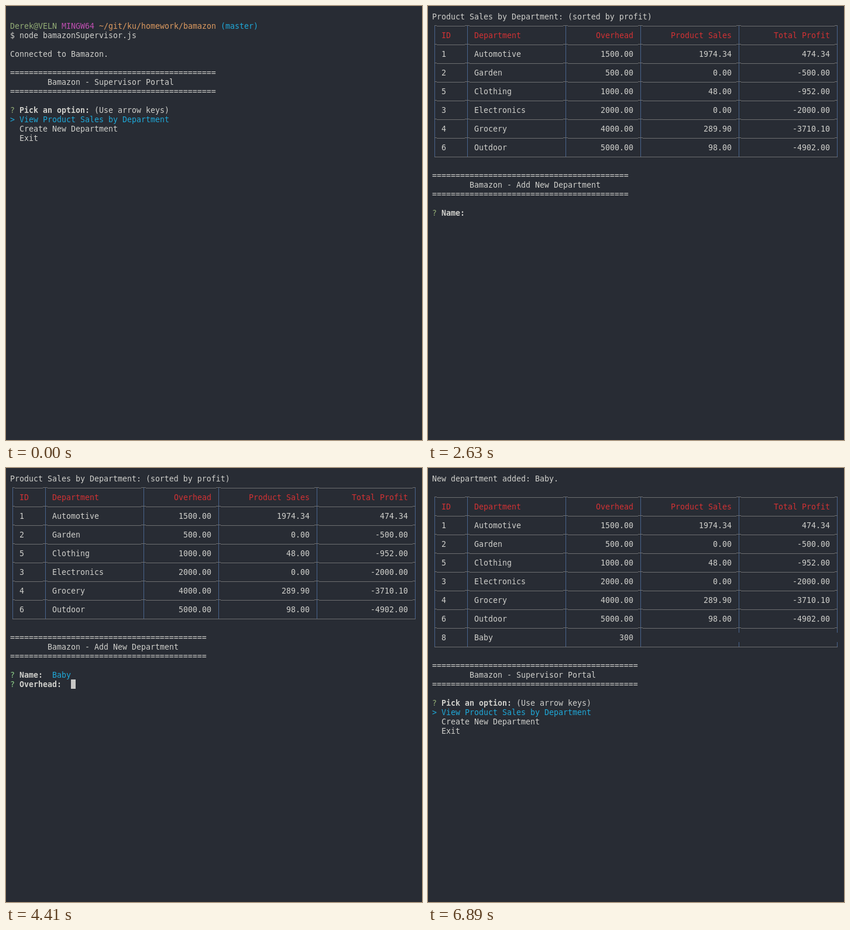
Animation of 711 by 743 pixels, one loop 9830 ms. Source, as an HTML page:

```html
<!DOCTYPE html>
<html lang="en">
<head>
<meta charset="utf-8">
<title>Supervisor portal</title>
<style>
  html, body { margin: 0; width: 100%; height: 100%; overflow: hidden; background: #282c34; }
  svg { display: block; width: 711px; height: 743px; }
  text { font: 13.29px "DejaVu Sans Mono", "Liberation Mono", monospace; white-space: pre; }
  .bold { font-weight: bold; }
</style>
</head>
<body>
<svg id="screen" viewBox="0 0 711 743"></svg>
<script>
const LOOP = 9830, CELL_W = 8, CELL_H = 16, LEFT = 7, TOP = 10;
const C = {
  fg: '#cfcfcb', green: '#93ad76', bright: '#8fd08a', magenta: '#c04fb2',
  orange: '#dc9a60', cyan: '#1fa8d8', red: '#d23234',
  rule: '#6d6e70', wall: '#49648c', cursor: '#c8c8c6'
};
const screen = document.getElementById('screen');
let layer;

const px = col => LEFT + col * CELL_W;
const py = row => TOP + row * CELL_H;

function add(tag, attrs) {
  const el = document.createElementNS('http://www.w3.org/2000/svg', tag);
  for (const key in attrs) el.setAttribute(key, attrs[key]);
  return layer.appendChild(el);
}

const rect = (x, y, width, height, fill) => add('rect', { x, y, width, height, fill });

function text(col, row, str, fill = C.fg, cls = '') {
  add('text', { x: px(col), y: py(row) + 13, fill, class: cls }).textContent = str;
}

const cursor = (col, row) => rect(px(col), py(row), CELL_W, CELL_H, C.cursor);

function banner(row, title, width) {
  text(0, row, '='.repeat(width));
  text(8, row + 1, title);
  text(0, row + 2, '='.repeat(width));
}

function ask(row, label, mark = C.green) {
  text(0, row, '?', mark);
  text(2, row, label, C.fg, 'bold');
}

function menu(row, picked, hint) {
  banner(row, 'Bamazon - Supervisor Portal', 44);
  ask(row + 4, 'Pick an option:');
  if (hint) text(18, row + 4, '(Use arrow keys)');
  ['View Product Sales by Department', 'Create New Department', 'Exit'].forEach((item, i) => {
    const on = i === picked;
    if (on) text(0, row + 5 + i, '>', C.cyan);
    text(2, row + 5 + i, item, on ? C.cyan : C.fg);
  });
}

const HEAD = ['ID', 'Department', 'Overhead', 'Product Sales', 'Total Profit'];
const SALES = [
  ['1', 'Automotive', '1500.00', '1974.34', '474.34'],
  ['2', 'Garden', '500.00', '0.00', '-500.00'],
  ['5', 'Clothing', '1000.00', '48.00', '-952.00'],
  ['3', 'Electronics', '2000.00', '0.00', '-2000.00'],
  ['4', 'Grocery', '4000.00', '289.90', '-3710.10'],
  ['6', 'Outdoor', '5000.00', '98.00', '-4902.00']
];
const WALLS = [0, 7, 28, 44, 65, 86];

function table(row, data) {
  const lines = [HEAD, ...data];
  const mid = r => py(r) + 8;
  const end = row + lines.length * 2;

  // Walls; cells without a value leave a gap in the wall to their right.
  WALLS.forEach((col, i) => {
    const x = px(col) + 4;
    rect(x, mid(row), 1, mid(end) - mid(row), C.wall);
    lines.forEach((cells, n) => {
      if (i && !cells[i - 1]) rect(x, py(row + 1 + n * 2), 1, CELL_H, '#282c34');
    });
  });

  for (let r = row; r <= end; r += 2) {
    const y = mid(r), last = WALLS.length - 1;
    if (r === end) {
      rect(px(0) + 4, y, px(86) - px(0) + 1, 1, C.rule);
      continue;
    }
    WALLS.forEach((col, i) => {
      const from = i ? px(col) : px(col) + 4;
      const to = i < last ? px(col + 1) : px(col) + 5;
      rect(from, y - 1, to - from, 1, C.rule);
      if (i < last) rect(to, y, px(WALLS[i + 1]) - to, 1, C.rule);
    });
  }

  lines.forEach((cells, n) => cells.forEach((str, i) => {
    const col = i < 2 ? WALLS[i] + 2 : WALLS[i + 1] - 1 - str.length;
    text(col, row + 1 + n * 2, str, n ? C.fg : C.red);
  }));
}

function start(picked) {
  text(0, 1, 'Derek@VELN', C.green);
  text(11, 1, 'MINGW64', C.magenta);
  text(19, 1, '~/git/ku/homework/bamazon', C.orange);
  text(45, 1, '(master)', C.cyan);
  text(0, 2, '$ node bamazonSupervisor.js');
  text(0, 4, 'Connected to Bamazon.');
  menu(6, picked, picked === 0);
}

function form() {
  text(0, 0, 'Product Sales by Department: (sorted by profit)');
  table(1, SALES);
  banner(17, 'Bamazon - Add New Department', 42);
}

function typeName(value, caret = true) {
  form();
  ask(21, 'Name:');
  text(9, 21, value);
  if (caret) cursor(9 + value.length, 21);
}

function typeOverhead(value, caret = true) {
  form();
  ask(21, 'Name:', C.bright);
  text(9, 21, 'Baby', C.cyan);
  ask(22, 'Overhead:', C.bright);
  text(13, 22, value);
  if (caret) cursor(13 + value.length, 22);
}

function saving() {
  form();
  ask(21, 'Name:');
  text(9, 21, 'Baby', C.cyan);
  cursor(16, 22);
}

function done() {
  text(0, 0, 'New department added: Baby.');
  table(2, [...SALES, ['8', 'Baby', '300', '', '']]);
  menu(20, 0, true);
}

const STEPS = [
  [0, start, 0],
  [1530, start, 1],
  [2080, typeName, ''],
  [2630, typeName, '', false],
  [2940, typeName, 'B'],
  [3170, typeName, 'Ba'],
  [3400, typeName, 'Bab'],
  [3860, typeName, 'Baby'],
  [4410, typeOverhead, ''],
  [5020, typeOverhead, '', false],
  [5650, typeOverhead, ''],
  [5880, typeOverhead, '3'],
  [6040, typeOverhead, '30'],
  [6190, typeOverhead, '300'],
  [6800, saving],
  [6890, done]
];

let shown = -1;
function show(t) {
  const step = STEPS.findLastIndex(([at]) => at <= t);
  if (step === shown) return;
  shown = step;
  const [, draw, ...args] = STEPS[step];
  layer = document.createElementNS('http://www.w3.org/2000/svg', 'g');
  draw(...args);
  screen.replaceChildren(layer);
}

const t0 = performance.now();
function tick() {
  show((performance.now() - t0) % LOOP);
  requestAnimationFrame(tick);
}
tick();
</script>
</body>
</html>
```
